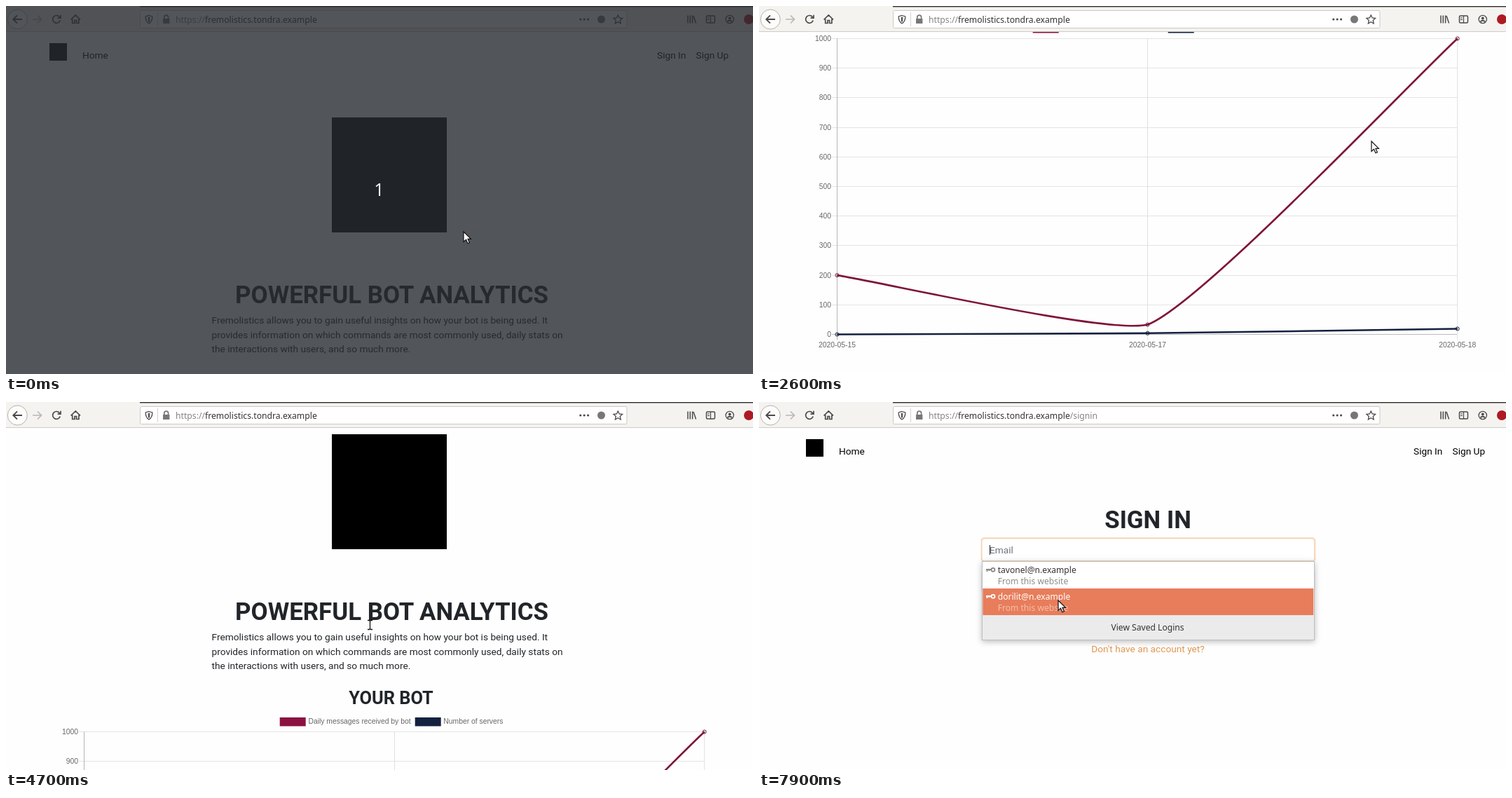
Animation of 1066x525 px, one loop 8000 ms. Source, as an HTML page:

```html
<!DOCTYPE html>
<html lang="en">
<head>
<meta charset="utf-8">
<title>Bot analytics tour</title>
<style>
html, body { margin: 0; width: 100%; height: 100%; overflow: hidden; background: #fefefe; }
svg { display: block; width: 1066px; height: 525px; }
text { font: 13.7px Roboto, sans-serif; fill: #212529; white-space: pre; }
.big { font-weight: 700; font-size: 34.9px; }
.mid { font-weight: 700; font-size: 25.4px; }
.nav text { fill: #000; }
.chart text { font: 10.35px "Liberation Sans", Arial, sans-serif; fill: #666; }
.ui text { font: 12.1px "Noto Sans", sans-serif; fill: #333; }
.center { text-anchor: middle; }
.end { text-anchor: end; }
.icon { fill: none; stroke: #4a4a4a; stroke-width: 1.7; }
.field { fill: #fff; stroke: #ced4da; }
.hint { fill: #6c757d; }
.ui .note { fill: #8c8c8c; }
.hot rect { fill: #e77d5b; }
.hot text { fill: #fff; }
.hot .note { fill: #f4bfab; }
.key { fill: none; stroke: #888; stroke-width: 1.8; }
.hot .key { stroke: #fff; }
</style>
</head>
<body>
<svg viewBox="0 0 1066 525">
  <rect width="1066" height="525" fill="#fefefe"/>

  <g id="home">
    <g class="nav">
      <rect x="62" y="53" width="25" height="25"/>
      <text x="109" y="74.5">Home</text>
      <text x="929" y="74.5">Sign In</text>
      <text x="984.5" y="74.5">Sign Up</text>
    </g>
    <rect x="465" y="159" width="164" height="164"/>
    <text class="big center" x="550.5" y="423.5">POWERFUL BOT ANALYTICS</text>
    <text x="293.5" y="453">Fremolistics allows you to gain useful insights on how your bot is being used. It</text>
    <text x="293.5" y="473.7">provides information on which commands are most commonly used, daily stats on</text>
    <text x="293.5" y="494.4">the interactions with users, and so much more.</text>
    <text class="mid center" x="549.5" y="543.5">YOUR BOT</text>
    <g class="chart" id="chart"></g>
    <text class="mid" x="75" y="1237">LEARN MORE ABOUT</text>
    <text class="mid" x="75" y="1265.3">HOW PEOPLE ARE USING</text>
    <text class="mid" x="75" y="1293.6">YOUR BOT.</text>
  </g>

  <g id="signin">
    <g class="nav">
      <g id="brand">
        <rect x="67" y="53" width="25" height="25"/>
        <text x="114" y="74.5">Home</text>
      </g>
      <text x="934" y="74.5">Sign In</text>
      <text x="989.5" y="74.5">Sign Up</text>
    </g>
    <text class="big center" x="555" y="180.3">SIGN IN</text>
    <rect id="ring" x="316.5" y="193" width="478" height="35.5" rx="5" fill="#fbe0c8"/>
    <rect id="email" class="field" x="318" y="194.8" width="474.7" height="32" rx="3.5"/>
    <text class="hint" x="329" y="216">Email</text>
    <rect class="field" x="318" y="240.9" width="474.7" height="32" rx="3.5"/>
    <text class="hint" x="329" y="262">Password</text>
    <rect x="529" y="287" width="52.5" height="26.5" rx="2.8" fill="#30b74a"/>
    <text class="center" x="555.2" y="304.3" style="font-size:12.1px;fill:#fff">Sign In</text>
    <path d="M318 327.5H793" stroke="#e4e4e4"/>
    <text class="center" x="555" y="357" style="fill:#df9850">Don't have an account yet?</text>

    <g class="ui" id="menu">
      <path d="M329.5 204V218" stroke="#222"/>
      <rect x="318.5" y="227.5" width="474" height="112" fill="#fff" stroke="#bdbdbd"
            style="filter:drop-shadow(0 2px 4px #0004)"/>
      <g id="row1"></g>
      <g id="row2" transform="translate(0 38)"></g>
      <rect x="319" y="304.5" width="473" height="34.5" fill="#ebebeb"/>
      <text class="center" x="554.5" y="326">View Saved Logins</text>
    </g>
  </g>

  <g class="ui">
    <rect width="1066" height="37" fill="#f4f3f0"/>
    <path d="M0 36.5H1066" stroke="#cfcdc9"/>
    <path d="M191 .7H1066" stroke="#3d3c39" stroke-width="1.5"/>
    <rect x="191.5" y="6.5" width="694.5" height="25" rx="2" fill="#fff" stroke="#cbcac7"/>
    <circle cx="16.3" cy="19" r="14" fill="#fcfcfb" stroke="#b4b3b0"/>
    <g class="icon">
      <path d="M23 19H10.5M16 13.3L10.3 19L16 24.7" stroke-width="1.9"/>
      <path d="M38 19H50.5M45 13.5L50.5 19L45 24.5" stroke="#b9b8b5"/>
      <path id="reload" d="M76.6 16A5.4 5.4 0 1 0 77.2 20.5M78 12.8V17.2H73.6"/>
      <path id="stop" d="M66.8 13.8L77.2 24.2M77.2 13.8L66.8 24.2"/>
      <path d="M92.5 19.5L99.3 13L106 19.5M94.7 18.5V24.5H98V20.5H100.6V24.5H103.9V18.5"/>
      <path d="M204 13.5L208.8 15C208.8 20 207.5 23 204 25C200.5 23 199.2 20 199.2 15Z" stroke-width="1.3"/>
      <path d="M204 15.8V22.5" stroke-width="2.2"/>
      <path d="M216.5 9V29" stroke="#d2d2d0" stroke-width="1"/>
      <path d="M225.8 18V16A2.9 2.9 0 0 1 231.6 16V18" stroke="#777"/>
      <rect x="224.5" y="18.5" width="8.4" height="6" fill="#777" stroke="#777" stroke-width="1"/>
      <path d="M819.8 19H835" stroke-width="3.2" stroke-linecap="round" stroke-dasharray="0 5.4"/>
      <path d="M873.3 13L875.2 17L879.6 17.5L876.3 20.5L877.2 25L873.3 22.7L869.4 25L870.3 20.5L867 17.5L871.4 17Z" stroke-width="1.3"/>
      <path d="M973 13.5V24.5M976.3 13.5V24.5M979.6 13.5V24.5M981 14L984.6 24.5" stroke-width="1.5"/>
      <rect x="999.5" y="14" width="12" height="10" rx="1.5" stroke-width="1.5"/>
      <path d="M1005.5 14V24M1001 17H1004M1001 19.5H1004" stroke-width="1.2"/>
      <circle cx="1032.8" cy="19" r="5.7" stroke-width="1.3"/>
      <circle cx="1032.8" cy="17.5" r="1.9" fill="#4a4a4a" stroke="none"/>
      <path d="M1029.5 22.2Q1032.8 19.3 1036.1 22.2" stroke-width="2"/>
    </g>
    <circle cx="849.5" cy="19" r="5.5" fill="#777"/>
    <circle cx="1060" cy="19" r="7" fill="#ad1a22"/>
    <text x="242" y="24" style="font-size:12.2px"><tspan fill="#858585">https://</tspan>fremolistics.tondra.example<tspan id="path" fill="#858585">/signin</tspan></text>
  </g>

  <g id="veil" class="ui">
    <rect width="1066" height="525" fill="#282c31" opacity=".803"/>
    <text class="center" x="532.5" y="271" style="font-size:25px;fill:#ececec">1</text>
  </g>
  <path id="arrow" d="M0 0V14.5L3.5 11.3L6 16.8L8.4 15.7L6 10.4H10.4Z" fill="#fff" stroke="#111" stroke-width="1.2"/>
  <path id="beam" d="M0 .5H2.5L3.5 1.5L4.5 .5H7M3.5 1.5V12.5M0 13.5H2.5L3.5 12.5L4.5 13.5H7" fill="none" stroke="#111" stroke-width="1.3"/>
</svg>
<script>
const $ = id => document.getElementById(id);
const LOOP = 8000, STEP = 100;

const rect = (x, y, w, h, fill) => `<rect x="${x}" y="${y}" width="${w}" height="${h}" fill="${fill}"/>`;
const line = (d, color, width = 1) => `<path d="${d}" fill="none" stroke="${color}" stroke-width="${width}"/>`;
const text = (x, y, s, cls = '') => `<text x="${x}" y="${y}" class="${cls}">${s}</text>`;

// Smooth curve through three points; handles follow the neighbours' direction.
function spline([a, b, c], floor, tension = .15) {
  const ab = Math.hypot(b[0] - a[0], b[1] - a[1]), bc = Math.hypot(c[0] - b[0], c[1] - b[1]);
  const toward = (p, from, to, k) =>
    [p[0] + k * (to[0] - from[0]), Math.min(floor, p[1] + k * (to[1] - from[1]))];
  const before = toward(b, a, c, -tension * ab / (ab + bc));
  const after = toward(b, a, c, tension * bc / (ab + bc));
  return `M${a}C${toward(a, a, b, tension)} ${before} ${b}C${after} ${toward(c, b, c, -tension)} ${c}`;
}

function lineChart() {
  const xs = [111.5, 554.5, 996.7], top = 583.5, base = 1005.5;
  const yOf = v => base - (base - top) * v / 1000;
  let s = '';
  for (let v = 0; v <= 1000; v += 100) {
    const y = Math.floor(yOf(v)) + .5;
    s += line(`M104 ${y}H${xs[2]}`, v ? '#e4e4e4' : '#bbb') + text(103, y + 3.4, v, 'end');
  }
  [15, 17, 18].forEach((day, i) => {
    s += line(`M${xs[i]} ${top}V${base + 8}`, i ? '#e0e0e0' : '#b5b5b5');
    s += text(xs[i], base + 18, '2020-05-' + day, 'center');
  });
  for (const [color, values] of [['#7f1439', [200, 33, 1000]], ['#14213f', [0, 4, 19]]]) {
    const points = values.map((v, i) => [xs[i], yOf(v)]);
    s += line(spline(points, base), color, 2.6);
    for (const [x, y] of points)
      s += `<circle cx="${x}" cy="${y}" r="2.6" fill="#0002" stroke="${color}" stroke-width=".9"/>`;
  }
  s += rect(390.7, 563, 37, 12.5, '#8c1140') + text(431.5, 572, 'Daily messages received by bot');
  return s + rect(583.7, 563, 37, 12.5, '#13213f') + text(624.3, 572, 'Number of servers');
}

// name, colour, legend x, end angle in degrees
const slices = [
  ['help', '#857a51', 409, 155], ['stats', '#b83b78', 476.5, 205],
  ['joke', '#4bbb9b', 546, 240], ['clear', '#2d6ca3', 613, 313.4],
  ['ping', '#8a0086', 683, 329], ['kick', '#6e0757', 750.5, 360],
  ['reboot', '#de2cc8', 816, 360]
];

function doughnut() {
  const at = (r, deg) => {
    const a = deg * Math.PI / 180;
    return `${645.6 + r * Math.sin(a)} ${1273.5 - r * Math.cos(a)}`;
  };
  let s = '', from = 0;
  for (const [name, color, x, to] of slices) {
    s += rect(x, 1126.8, 32.8, 8.2, color) + text(x + 38.8, 1133.7, name);
    if (to > from) {
      const big = +(to - from > 180);
      s += `<path d="M${at(127.5, from)}A127.5 127.5 0 ${big} 1 ${at(127.5, to)}L${at(65, to)}` +
        `A65 65 0 ${big} 0 ${at(65, from)}Z" fill="${color}" stroke="#fff" stroke-width="1.7"/>`;
    }
    from = to;
  }
  return s + line('M854.5 1130.5H883', '#666');
}

const login = address => rect(319.3, 228, 472, 38.3, '#fff') +
  '<path class="key" d="M324 239H331M325.5 239V242M328.5 239V241"/>' +
  '<circle class="key" cx="334" cy="239.3" r="2.5"/>' +
  text(340.7, 244, address) + text(340.7, 260, 'From this website', 'note');

$('chart').innerHTML = lineChart() + doughnut();
$('row1').innerHTML = login('tavonel@n.example');
$('row2').innerHTML = login('dorilit@n.example');

// time, then values
const scroll = [
  [200, 0], [500, 330], [600, 330], [1000, 684], [1100, 690], [1500, 537],
  [2600, 537], [3000, 900], [3800, 900], [4000, 768], [4700, 113], [4900, 0]
];
const pointer = [
  [500, 653, 322], [1000, 469, 400], [1500, 520, 300], [1900, 700, 250], [2100, 700, 250],
  [2600, 874, 193], [3000, 712, 345], [3700, 180, 490], [3800, 180, 490], [4000, 406, 254],
  [4700, 516, 311], [5000, 579, 273], [5100, 579, 273], [5500, 915, 67], [5700, 915, 67],
  [5800, 950, 66], [5900, 950, 66], [6200, 520, 298], [6700, 520, 298], [6800, 441, 233],
  [7000, 440, 203], [7400, 440, 203], [7700, 427, 283]
];

function track(keys, t) {
  const i = keys.findIndex(k => k[0] > t);
  if (i < 0) return keys.at(-1).slice(1);
  if (i === 0) return keys[0].slice(1);
  const a = keys[i - 1], b = keys[i], u = (t - a[0]) / (b[0] - a[0]);
  return a.slice(1).map((v, j) => v + (b[j + 1] - v) * u);
}

const show = (id, on) => { $(id).style.display = on ? '' : 'none'; };
const move = (id, x, y) => $(id).setAttribute('transform', `translate(${x} ${y})`);
const within = (t, from, to) => t >= from && t < to;

function draw(now) {
  const t = Math.floor(now % LOOP / STEP) * STEP;
  const loading = within(t, 5900, 7500), open = t >= 7100;
  const beam = within(t, 4600, 5000) || within(t, 7000, 7500);

  move('home', 0, -Math.round(track(scroll, t)[0]));
  show('home', t < 6400);
  show('signin', t >= 6400);
  show('path', t >= 6400);
  show('brand', t >= 6600);
  show('reload', !loading);
  show('stop', loading);
  show('veil', t < 200);

  show('menu', open);
  show('ring', open);
  $('email').style.stroke = open ? '#f5cda8' : '';
  $('row1').classList.toggle('hot', within(t, 7600, 7700));
  $('row2').classList.toggle('hot', t >= 7700);

  const [x, y] = track(pointer, t);
  move('arrow', x, y);
  move('beam', x, y);
  show('arrow', !beam);
  show('beam', beam);
  requestAnimationFrame(draw);
}
requestAnimationFrame(draw);
</script>
</body>
</html>
```
